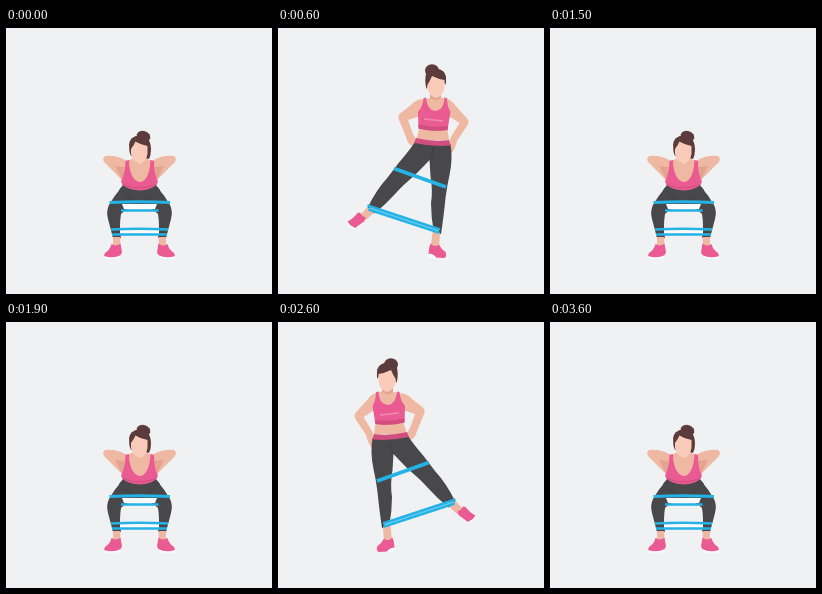
An HTML page with a canvas that plays this animation: 266 px wide and 266 px high, repeating every 3700 ms.

```html
<!DOCTYPE html>
<html lang="en">
<head>
<meta charset="utf-8">
<title>Resistance band workout</title>
<style>
html, body { margin: 0; width: 100%; height: 100%; overflow: hidden; background: #eff1f3; }
canvas { display: block; width: 100vw; height: 100vh; }
</style>
</head>
<body>
<canvas id="stage"></canvas>
<script>
const SIZE = 266, LOOP = 3700, AXIS = 267;
const BG = '#eff1f3', SKIN = '#efb8a2', FACE = '#fbcbb9', SHADE = '#e2a48e';
const HAIR = '#5c3b3d', PINK = '#e95b92', ROSE = '#d04f7f', DARK = '#48484a', DEEP = '#3e3e41';
const BLUE = '#25b3e6', PALE = '#86d3ee', WHITE = '#f8fafb';

const canvas = document.getElementById('stage');
const ctx = canvas.getContext('2d');

function fill(color, d) {
  ctx.fillStyle = color;
  ctx.fill(new Path2D(d));
}

function line(color, width, d) {
  ctx.strokeStyle = color;
  ctx.lineWidth = width;
  ctx.lineJoin = 'round';
  ctx.stroke(new Path2D(d));
}

function oval(color, x, y, rx, ry, turn = 0) {
  ctx.fillStyle = color;
  ctx.beginPath();
  ctx.ellipse(x, y, rx, ry, turn, 0, Math.PI * 2);
  ctx.fill();
}

function mirrored(draw) {
  ctx.save();
  ctx.translate(AXIS, 0);
  ctx.scale(-1, 1);
  draw();
  ctx.restore();
}

function both(draw) {
  draw();
  mirrored(draw);
}

// Standing, leg raised towards the left
function kick() {
  // arms
  fill(SKIN, 'M144 71 Q137 72 133 77 L121.5 86 Q119.5 88.5 121 92 L128 109 Q130 117 135 118 L138 111 L135 106 L130 92 L142 88Z');
  fill(SKIN, 'M166 71 Q174 72 177 77 L189.5 91 Q191.5 94 189.5 97 L179 113 Q177 122 172 127 L169 119 L173 109 L181.5 95 L169 87Z');

  // torso and neck
  fill(SKIN, 'M152 62 L163 62 L163 69.5 Q171 70 175 75 L169 98 L171 112 L138 112 L142 99 L138 76 Q142 71 152 70Z');
  fill(SHADE, 'M152 67 Q158 72 163 67 L163 70 Q158 74 152 70Z');

  // hair and face
  oval(HAIR, 154, 42.5, 7, 6.3);
  oval(HAIR, 158, 49, 10, 8.5, 0.2);
  fill(HAIR, 'M148.5 44 Q146 52 148.5 61 L153 52 L164 49 L167.5 57 Q169.5 50 165 43Z');
  fill(FACE, 'M149.3 57 Q152 53 154 48 Q160 51 166.5 52 L166.5 60 Q165 68 158 70 Q150.5 67 149.3 60Z');

  // top
  fill(PINK, 'M145.5 70 L148 69.5 Q149 82 157 83 Q166 82 166.5 69.5 L169 70 Q169 78 172.5 84 L169.5 102 Q155 104 140.5 100.5 L140 84 Q145 78 145.5 70Z');
  fill(ROSE, 'M140.5 96.5 Q155 100 170.2 98 L169.5 102 Q155 104 140.5 100.5Z');
  line('#f08bb0', 1.4, 'M146 91 L165 93');

  // leggings
  fill(DARK, 'M137 114 L172.5 116 Q175 130 171.5 147 Q169 158 167.5 170 Q166 186 163 206 L156 205 Q153 190 153 175 Q155 163 152.5 148 L151.5 132 Q146 138 136 148 Q125 157 118 165 Q108 176 96.5 185.5 L89.5 180 Q98 162 110 149 L121 134.5 Q131 123 137 114Z');
  line(DEEP, 1, 'M155 120 Q155 128 151.5 132');
  fill(ROSE, 'M138 110 Q154 114 171 112 L172.5 117.5 Q154 119 136 115Z');

  // ankles and shoes
  fill(SKIN, 'M89.5 179 L95.5 185 L88 192 L82 187Z');
  fill(PINK, 'M79.5 185 L82 184.5 Q84 188.5 87.5 189.5 Q87 194 83 195.5 L77 200 Q72 198 69.5 193.5 Q76 190 79.5 185Z');
  fill(WHITE, 'M69.5 193.5 Q72 198 77 200 L76 201 Q70.5 199 69 194.5Z');
  fill(SKIN, 'M154.5 204 L162 205 L161 219 L153 218Z');
  fill(PINK, 'M152.5 215.5 Q157 220 161 216.5 Q163 221 167.5 224 Q169.5 229 166 230 L158 229.5 Q154 225 150.5 226 Q150.5 220 152.5 215.5Z');
  fill(WHITE, 'M150.5 226 Q154 225 158 229.5 L157 231 L151 229.5Z');

  // bands
  line(BLUE, 3.8, 'M116 140.5 L168 159');
  line(PALE, 4, 'M91 179.5 L160.5 203');
  line(BLUE, 2.4, 'M89.5 177.5 L162 201.5');
  line(BLUE, 2.4, 'M90.5 181.5 L161.5 204.8');
}

function squatSide() {
  // arm
  fill(SKIN, 'M119 132 Q110 127 99 128 Q96 130 98 134 L116 152 Q122 154 124 149 L122 139 L127 134Z');
  fill(SHADE, 'M109 138 L119 139 L119 151 L116 152Z');
  // leg
  fill(DARK, 'M134 161 L115 160 Q108 168 103 177 Q100 183 102 191 L107 210 L115 210 Q113 198 115 186 Q121 179 134 178Z');
  // ankle and shoe
  fill(SKIN, 'M107 209 L114.5 209 L114 219 L107 219Z');
  fill(PINK, 'M105.5 216 Q110 219 114.5 215.5 L116 224 Q115 229 109 230 L100 230 Q97 228 99 225 Q104 222 105.5 216Z');
  fill(WHITE, 'M98 228 Q107 231 115 227 L113 230.5 L99 231Z');
}

function squat() {
  // hair behind
  oval(HAIR, 137.5, 108.5, 7, 5.5, 0.3);
  fill(HAIR, 'M139 107 Q145 113 145 121 Q145 127 143 131 L139 130Z');
  both(squatSide);

  // torso
  fill(SKIN, 'M119 134 L128 130 L139 130 L148 134 L151 154 L146 163 L121 163 L116 154Z');
  fill(DARK, 'M117 157 Q133 165 150 157 L154 162 Q149 177 134 179 Q118 177 113 162Z');
  fill(PINK, 'M119.5 133 L123 132 Q125 153 134 154 Q143 153 144.5 132 L148 133 Q148 145 152 154 Q148 162 134 162.5 Q119 162 115 154 Q119 145 119.5 133Z');
  fill(SKIN, 'M123 136 Q125 153 134 153.5 Q142 153 144 136 L139 131 L128 131Z');
  line(ROSE, 1, 'M116 156 Q133 164 151 156');
  line(DEEP, 1, 'M119 168 L133.5 176 L148 168');

  // head
  oval(HAIR, 133, 116.5, 10, 9);
  fill(HAIR, 'M124 116 Q122 122 125 128 L142 128 Q144 120 142 114Z');
  fill(FACE, 'M125 121 Q128 117 129.5 113.5 Q135 117 141.5 118 L141.5 126 Q140 134 133.5 136 Q126 133 125 126Z');

  // bands
  fill(WHITE, 'M116 176 L151 176 L149 181 L118 181Z');
  fill(WHITE, 'M114 202 L153 202 L153 206 L114 206Z');
  line(BLUE, 2.8, 'M103.5 174.5 Q133 173 164 174.5');
  line(BLUE, 2.4, 'M115 182.5 L152.5 182.5');
  line(BLUE, 2.5, 'M105 201.5 Q133 200 162 201.5');
  line(BLUE, 2.5, 'M106 206.5 L161 206.5');
}

function pose(t) {
  if (t >= 200 && t < 1200) kick();
  else if (t >= 2200 && t < 3200) mirrored(kick);
  else squat();
}

function fit() {
  const ratio = window.devicePixelRatio || 1;
  const w = Math.round(innerWidth * ratio), h = Math.round(innerHeight * ratio);
  if (canvas.width !== w || canvas.height !== h) {
    canvas.width = w;
    canvas.height = h;
  }
}

const start = performance.now();

function frame() {
  fit();
  ctx.setTransform(canvas.width / SIZE, 0, 0, canvas.height / SIZE, 0, 0);
  ctx.fillStyle = BG;
  ctx.fillRect(0, 0, SIZE, SIZE);
  pose((performance.now() - start) % LOOP);
  requestAnimationFrame(frame);
}
frame();
</script>
</body>
</html>
```
